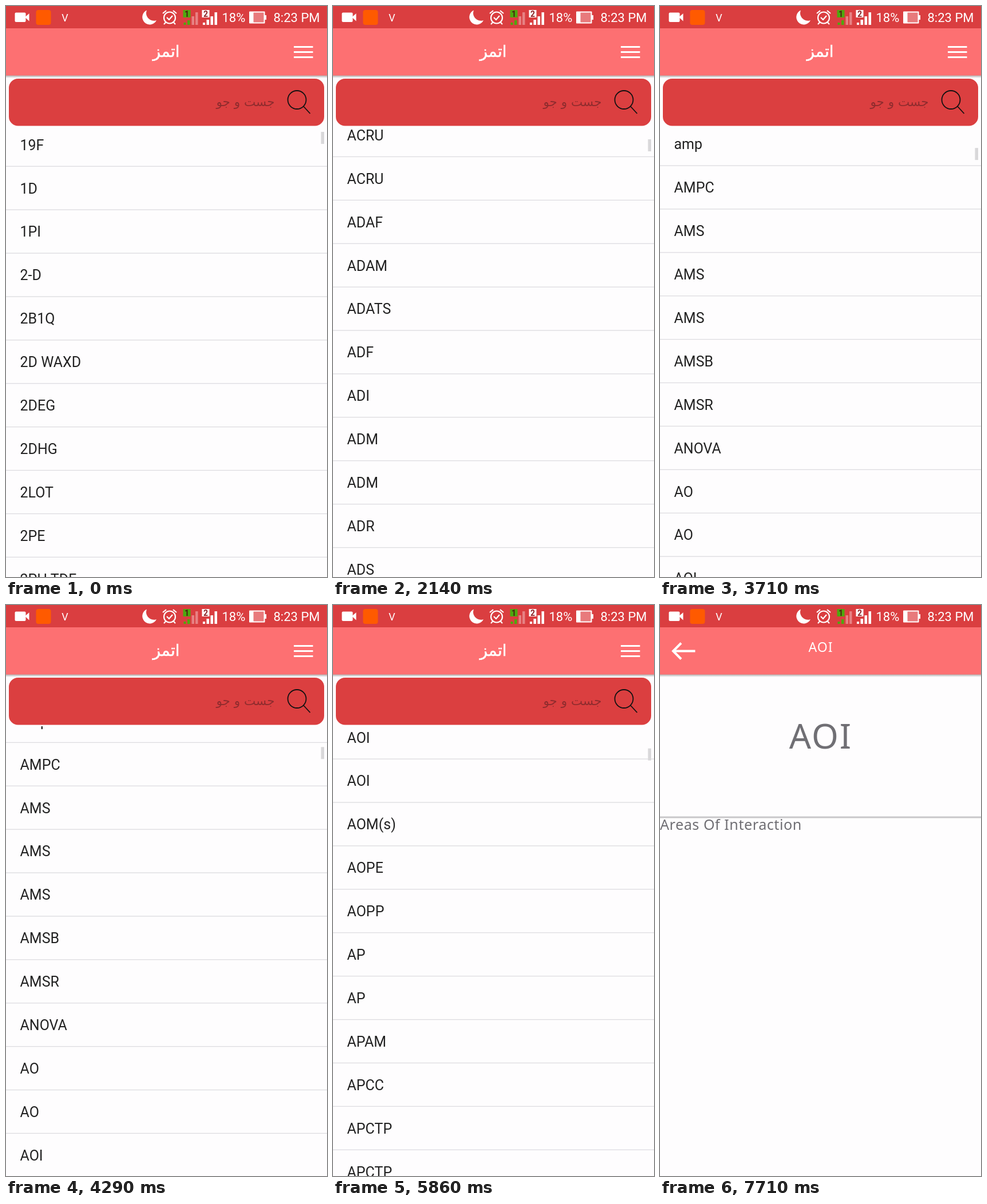
Animation of 561 by 998 pixels, one loop 8000 ms. Source, as an HTML page:

```html
<!DOCTYPE html>
<html lang="fa">
<head>
<meta charset="utf-8">
<title>Glossary list</title>
<style>
  html, body { margin: 0; width: 100%; height: 100%; overflow: hidden; background: #fefdfe; }
  svg { display: block; width: 100%; height: 100%; }
  text { font-family: Roboto, sans-serif; }
  .fa { font-family: "DejaVu Sans", sans-serif; direction: rtl; text-anchor: middle; }
  .noto { font-family: "Noto Sans", sans-serif; }
  .mid { text-anchor: middle; }
  .row { font-size: 25px; fill: #222; }
  .line { fill: none; stroke: #fff; }
</style>
</head>
<body>
<svg viewBox="0 0 561 998">
  <defs>
    <linearGradient id="shade" x1="0" y1="0" x2="0" y2="1">
      <stop offset="0" stop-color="#555" stop-opacity=".5"/>
      <stop offset="1" stop-color="#555" stop-opacity="0"/>
    </linearGradient>
    <clipPath id="listClip"><rect y="212" width="561" height="786"/></clipPath>
    <g id="toolbar">
      <rect y="121" width="561" height="5" fill="url(#shade)"/>
      <rect y="38" width="561" height="83.5" fill="#fd7072"/>
    </g>
  </defs>

  <rect width="561" height="998" fill="#fefdfe"/>
  <g clip-path="url(#listClip)">
    <g id="list"></g>
    <rect id="thumb" x="550.5" width="5.5" height="21" fill="#d9d8da"/>
  </g>

  <use href="#toolbar"/>
  <text class="fa" x="280" y="89" font-size="28" fill="#fff" stroke="#fff" stroke-width=".6">اتمز</text>
  <path class="line" d="M503 71.500h33.500M503 80.500h33.500M503 89.500h33.500" stroke-width="3"/>
  <rect x="5" y="127" width="551" height="82.500" rx="16" fill="#db3f40"/>
  <text class="fa" x="418.500" y="175" font-size="21.500" fill="#8f2c2e">جست و جو</text>
  <g fill="none" stroke="#111" stroke-width="1.800">
    <circle cx="508.500" cy="164" r="16"/>
    <path d="M520 175.500L531.500 188"/>
  </g>

  <g id="page">
    <rect y="38" width="561" height="1000" fill="#fefdfe"/>
    <use href="#toolbar"/>
    <path class="line" d="M61.500 80.500H23M37 66.500L23 80.500L37 94.500" stroke-width="4"/>
    <text class="noto mid" x="281" y="82" font-size="23" letter-spacing="1" fill="#fff">AOI</text>
    <text class="noto mid" x="281" y="251" font-size="60" letter-spacing="2" fill="#706f74">AOI</text>
    <rect y="369.500" width="561" height="3" fill="#c9c8ca"/>
    <text class="noto" x="0" y="392.500" font-size="25.200" letter-spacing=".5" fill="#706f74">Areas Of Interaction</text>
  </g>

  <g id="status" fill="#fff">
    <rect width="561" height="39" fill="#da3e40"/>
    <rect x="15.500" y="11.500" width="19" height="16.500" rx="2"/>
    <path d="M33 19.500L40.500 13V26.500Z"/>
    <rect x="52.500" y="7" width="26" height="26" rx="4" fill="#ff5a00"/>
    <text class="mid" x="103" y="26.500" font-size="18">V</text>
    <path d="M246 7.500A13 13 0 1 0 263 25A13.500 13.500 0 0 1 246 7.500Z"/>
    <g class="line" stroke-width="2.200">
      <circle cx="286" cy="20.500" r="10"/>
      <path d="M274 13L280 8M298 13L292 8M279.500 28L276 32M292.500 28L296 32M281 20L285 24L291 17"/>
    </g>
    <g fill="#4fa80e">
      <rect x="309.500" y="7" width="13" height="13"/>
      <path d="M310.500 29h4v4h-4zM317 25h4.500v8h-4.500z"/>
    </g>
    <path d="M324.500 18h4.500v15h-4.500zM331 11h4.500v22h-4.500z" fill="#e78183"/>
    <text class="mid" x="316" y="18.500" font-size="14" font-weight="700" style="fill:#4a1c12">1</text>
    <path d="M342.500 7h13v13h-13zM344 29h4v4h-4zM350.500 24h4.500v9h-4.500zM357.500 18h4.500v15h-4.500zM364.500 11h4.500v22h-4.500z"/>
    <text class="mid" x="349" y="18.500" font-size="14" font-weight="700" style="fill:#8d2023">2</text>
    <text x="377.500" y="28" font-size="22">18%</text>
    <rect x="425" y="9.500" width="27.500" height="21" rx="1"/>
    <rect x="452" y="16" width="3" height="8"/>
    <rect x="432.500" y="11.500" width="18" height="17" fill="#e87a7c"/>
    <text x="467.500" y="28" font-size="22">8:23 PM</text>
  </g>
</svg>
<script>
  const LOOP = 8000, FPS = 7, PITCH = 75.9, FIRST = 242.4;

  const terms = ('19F,1D,1PI,2-D,2B1Q,2D WAXD,2DEG,2DHG,2LOT,2PE,2PH TDF,' +
    '2PPE,2QT,2SC,3D,3DAP,3DEG,3DES,3HE,4D,4WM,5D,6DOF,AA,AAS,AB,ABD,ABF,ABL,ABS,' +
    'AC,ACAR,ACB,ACC,ACD,ACE,ACF,ACF,ACG,ACH,ACI,ACL,ACN,ACO,ACP,ACPD,ACQ,ACR,ACR,ACRA,ACRP,ACRT,' +
    'ACRU,ACRU,ADAF,ADAM,ADATS,ADF,ADI,ADM,ADM,ADR,ADS,' +
    'ADSL,ADTF,ADU,ADV,ADX,AE,AEC,AED,AEM,AEP,AES,AES,AET,AF,AFC,AFD,AFE,AFI,AFM,AFM,AFS,AFT,' +
    'AG,AGB,AGC,AGN,AGS,AH,AHC,AHE,AI,AIM,AIR,AIS,AL,ALC,ALD,ALE,ALEP,ALF,ALH,' +
    'ALICE,ALPS,ALR,ALU,AMA,AMANDA,AMB,AMD,AMOP,amp,AMPC,AMS,AMS,AMS,AMSB,AMSR,ANOVA,AO,AO,' +
    'AOI,AOI,AOM(s),AOPE,AOPP,AP,AP,APAM,APCC,APCTP,APCTP,APD,APE').split(',');

  const $ = id => document.getElementById(id);
  const easeOut = power => u => 1 - (1 - u) ** power;
  const easeInOut = u => u * u * (3 - 2 * u);
  const at = (term, shift) => terms.indexOf(term) * PITCH + shift;

  // Scroll stops: [step, offset, easing towards this stop]
  const stops = [
    [5, 0],
    [15, at('ACRU', 16.8), easeOut(2.4)],
    [30, at('amp', 39.9), easeOut(3.624)],
    [36, at('AOI', 31.4), easeOut(2.4)],
    [41, at('AOI', 11.1), easeInOut]
  ];

  function scrollAt(step) {
    if (step <= stops[0][0]) return 0;
    for (let i = 1; i < stops.length; i++) {
      const [s0, y0] = stops[i - 1], [s1, y1, ease] = stops[i];
      if (step <= s1) return y0 + (y1 - y0) * ease((step - s0) / (s1 - s0));
    }
    return stops[stops.length - 1][1];
  }

  function add(parent, tag, attrs) {
    const el = document.createElementNS('http://www.w3.org/2000/svg', tag);
    for (const key in attrs) el.setAttribute(key, attrs[key]);
    return parent.appendChild(el);
  }

  const rows = Array.from({ length: 13 }, () => {
    const g = add($('list'), 'g', {});
    const label = add(g, 'text', { class: 'row', x: 24.5, y: 9.2 });
    add(g, 'rect', { y: 37.2, width: 561, height: 1.3, fill: '#dddce0' });
    return { g, label };
  });

  function draw(ms) {
    // The screen refreshes in discrete steps
    const step = Math.floor((ms % LOOP + 5) * FPS / 1000);
    const scroll = scrollAt(step);
    const top = Math.max(0, Math.floor(scroll / PITCH) - 1);

    rows.forEach(({ g, label }, i) => {
      const n = top + i;
      label.textContent = terms[n] || '';
      g.setAttribute('transform', `translate(0 ${(FIRST + n * PITCH - scroll).toFixed(2)})`);
    });
    $('thumb').setAttribute('y', (220 + scroll * 0.00328).toFixed(2));

    const shown = easeOut(3)(Math.min(1, Math.max(0, (step - 47) / 4)));
    $('page').setAttribute('opacity', shown);
    $('page').setAttribute('transform', `translate(0 ${40 * (1 - shown)})`);
  }

  const start = performance.now();
  function tick() {
    draw(performance.now() - start);
    requestAnimationFrame(tick);
  }
  tick();
</script>
</body>
</html>
```
